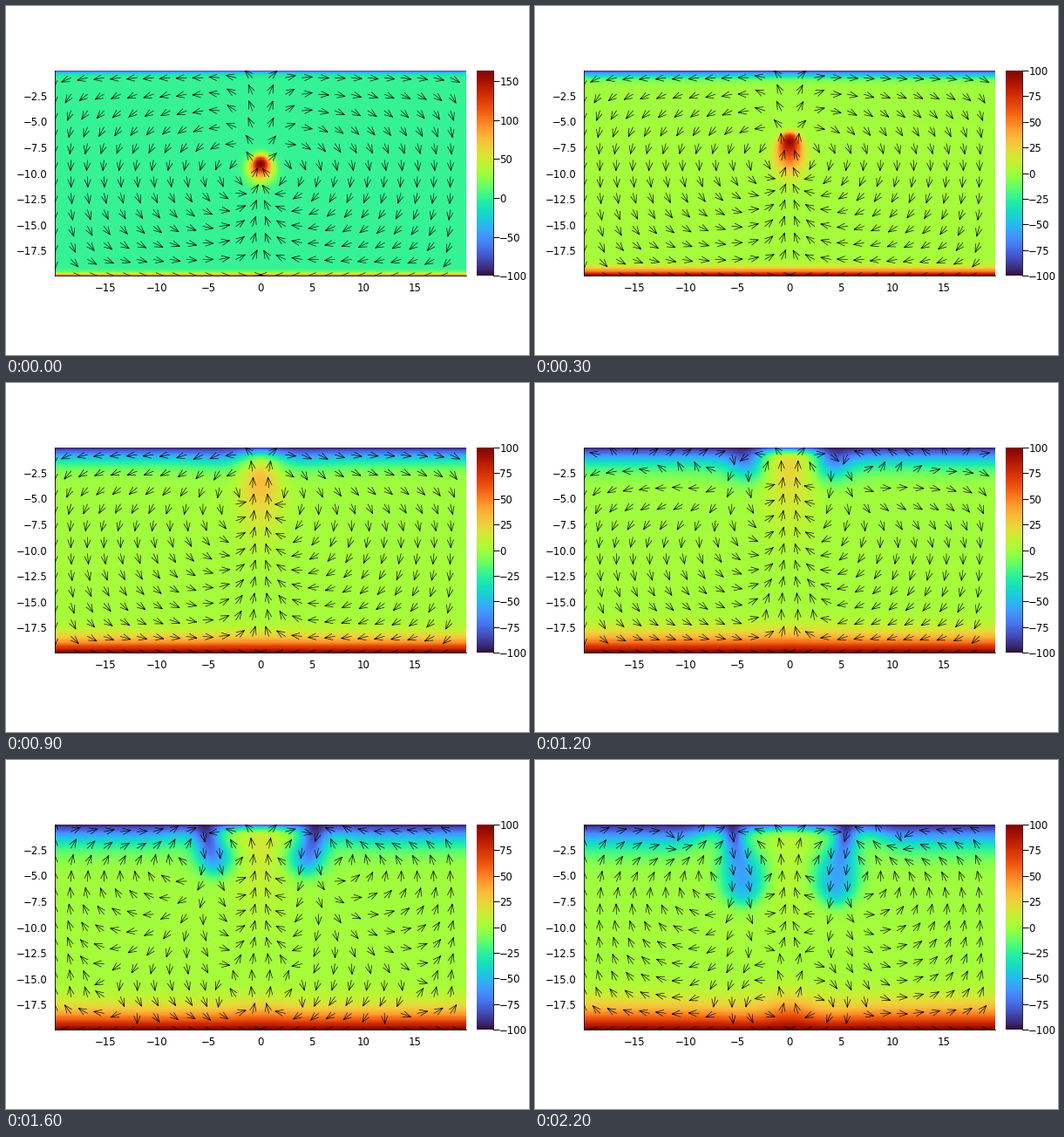
A matplotlib script for the animation above (2.3 s loop, 600 by 400 pixels).

```python
import numpy as np
import matplotlib.pyplot as plt
from matplotlib.animation import FuncAnimation

# Porous convection: Darcy flow coupled to heat transport on a staggered grid.
# The flow is mirror symmetric, so only the half x > 0 is computed.
LX, LY = 20.0, 20.0
NX, NY = 200, 200
H = LX / NX
DT = 200.0                        # temperature scale
PORO = 0.1
LAM = DT * LY / PORO / 1000.0     # diffusivity for a Rayleigh number of 1000
DIFF_LIMIT = H**2 / LAM / 4.1     # stable explicit diffusion step
FRAMES, STEPS = 23, 20

xh = (np.arange(NX) + 0.5) * H
xc = np.concatenate([-xh[::-1], xh])
yc = (np.arange(NY) + 0.5) * H - LY


def cosine_basis(n):
    """Orthonormal cosine modes and their Laplacian eigenvalues."""
    k = np.arange(n)
    c = np.cos(np.pi * np.outer(k, k + 0.5) / n) * np.sqrt(2 / n)
    c[0] /= np.sqrt(2)
    return c, (2 * np.cos(np.pi * k / n) - 2) / H**2


CX, EX = cosine_basis(NX)
CY, EY = cosine_basis(NY)
EIG = EX[:, None] + EY[None, :]
EIG[0, 0] = 1.0


def darcy_flux(T):
    """Divergence-free flux driven by buoyancy, closed walls."""
    qx = np.zeros((NX + 1, NY))
    qy = np.zeros((NX, NY + 1))
    qy[:, 1:-1] = (T[:, 1:] + T[:, :-1]) / 2
    rhs = CX @ (np.diff(qy, axis=1) / H) @ CY.T
    P = CX.T @ (rhs / EIG) @ CY
    qx[1:-1] -= np.diff(P, axis=0) / H
    qy[:, 1:-1] -= np.diff(P, axis=1) / H
    return qx, qy


def gradients(T):
    """Face gradients; insulated sides, y faces between cells only."""
    sides = np.concatenate([T[:1], T, T[-1:]])
    return np.diff(sides, axis=0) / H, np.diff(T, axis=1) / H


def step(T):
    qx, qy = darcy_flux(T)
    speed = max(np.abs(qx).max(), np.abs(qy).max())
    dt = PORO * H / speed / 2.1
    T = T.copy()
    # diffusion in stable substeps
    parts = int(np.ceil(dt / DIFF_LIMIT))
    for _ in range(parts):
        gx, gy = gradients(T)
        lap = np.diff(gx, axis=0)[:, 1:-1] + np.diff(gy, axis=1)
        T[:, 1:-1] += dt / parts * LAM / H * lap
    # upwind advection
    gx, gy = gradients(T)
    ux, uy = qx[:, 1:-1], qy[:, 1:-1]
    gx = gx[:, 1:-1]
    T[:, 1:-1] -= dt / PORO * (np.maximum(ux[:-1], 0) * gx[:-1]
                               + np.minimum(ux[1:], 0) * gx[1:]
                               + np.maximum(uy[:, :-1], 0) * gy[:, :-1]
                               + np.minimum(uy[:, 1:], 0) * gy[:, 1:])
    return T, qx, qy


def mirror(a, sign=1):
    return np.concatenate([sign * a[::-1], a])


def simulate():
    T = DT * np.exp(-xh[:, None]**2 - (yc[None, :] + LY / 2)**2)
    T[:, 0], T[:, -1] = DT / 2, -DT / 2
    states = []
    for _ in range(FRAMES):
        for _ in range(STEPS):
            T, qx, qy = step(T)
        u = mirror((qx[1:] + qx[:-1]) / 2, -1)
        v = mirror((qy[:, 1:] + qy[:, :-1]) / 2)
        states.append((mirror(T), u, v))
    return states


EVERY = 16
X0, Y0 = (g.ravel() for g in np.meshgrid(xc[::EVERY], yc[::EVERY], indexing="ij"))
HEAD, HALF = 0.74, 0.30


def arrow_lines(u, v):
    """Unit arrows with open heads as one broken polyline."""
    u, v = u[::EVERY, ::EVERY].ravel(), v[::EVERY, ::EVERY].ravel()
    mag = np.hypot(u, v) + 1e-12
    u, v = u / mag, v / mag
    x1, y1 = X0 + u, Y0 + v
    bx, by = x1 - HEAD * u, y1 - HEAD * v
    gap = np.full_like(u, np.nan)
    xs = [X0, x1, gap, bx - HALF * v, x1, bx + HALF * v, gap]
    ys = [Y0, y1, gap, by + HALF * u, y1, by - HALF * u, gap]
    return np.column_stack(xs).ravel(), np.column_stack(ys).ravel()


states = simulate()

plt.rcParams.update({"font.family": "DejaVu Sans", "font.size": 8.4})
W, HT = 600, 400
fig = plt.figure(figsize=(6, 4), dpi=100, facecolor="white")


def add_axes(left, top, right, bottom):
    return fig.add_axes([left / W, 1 - bottom / HT, (right - left) / W, (bottom - top) / HT])


ax = add_axes(55.6, 73.9, 527.6, 309.3)
im = ax.imshow(states[0][0].T, origin="lower", extent=(-LX, LX, -LY, 0),
               cmap="turbo", interpolation="nearest", aspect="auto")
arrows, = ax.plot([], [], color="black", lw=0.47, solid_joinstyle="miter")
ax.set_xlim(xc[0], xc[-1])
ax.set_ylim(yc[0], yc[-1])
ax.set_xticks(np.arange(-15, 16, 5))
ax.set_yticks(np.arange(-17.5, 0, 2.5))
ax.tick_params(length=0, pad=5.5)
ax.spines[["top", "right"]].set_visible(False)
ax.spines[["left", "bottom"]].set_linewidth(0.6)

cax = add_axes(540, 73.9, 558.6, 309.3)
cax.imshow(np.linspace(0, 1, 256)[:, None], origin="lower", extent=(0, 1, 0, 1),
           cmap="turbo", interpolation="nearest", aspect="auto")
cax.set_xticks([])
cax.yaxis.tick_right()
cax.tick_params(axis="y", length=5, width=0.7, pad=0.5)
cax.spines[["top", "left", "bottom"]].set_visible(False)
cax.spines["right"].set_linewidth(0.6)


def update(i):
    T, u, v = states[i]
    lo, hi = T.min(), T.max()
    im.set_data(T.T)
    im.set_clim(lo, hi)
    arrows.set_data(*arrow_lines(u, v))
    gap = 25 if hi - lo <= 250 else 50
    ticks = np.arange(-100, hi + 0.01, gap)
    cax.set_yticks((ticks - lo) / (hi - lo),
                   [f"{t:.0f}".replace("-", "\u2212") for t in ticks])
    cax.set_ylim(0, 1)
    return im, arrows


anim = FuncAnimation(fig, update, frames=FRAMES, interval=100, repeat=True, repeat_delay=0)
plt.show()
```
